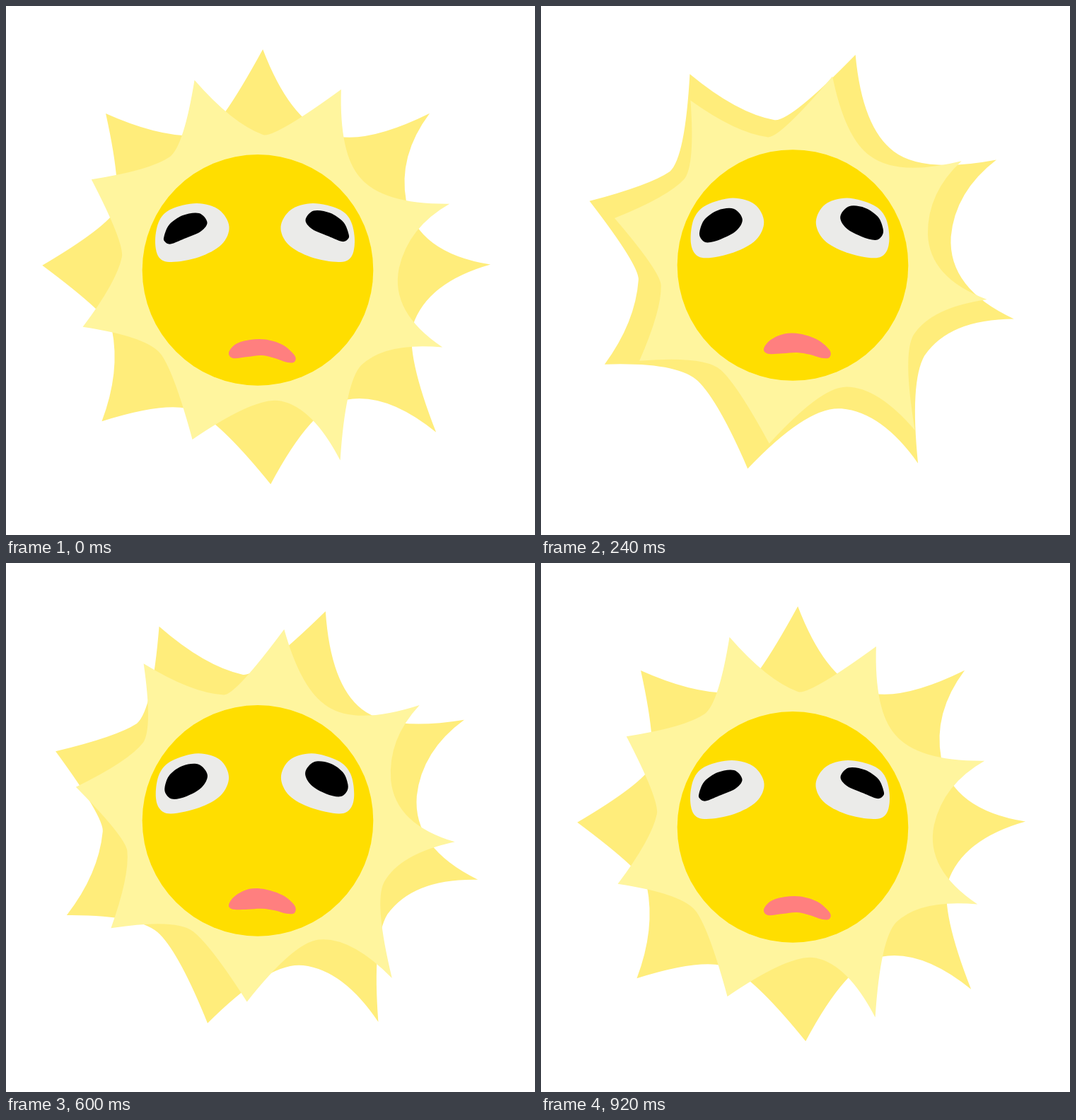
Write an HTML page with a canvas that moves like this. It is 748 px wide and 748 px high and loops after 960 ms.

```html
<!DOCTYPE html>
<html lang="en">
<head>
<meta charset="utf-8">
<title>Sun</title>
<style>
html, body { margin: 0; height: 100%; overflow: hidden; background: #fff; }
canvas { display: block; }
</style>
</head>
<body>
<canvas id="stage" width="748" height="748"></canvas>
<script>
const ctx = document.getElementById('stage').getContext('2d');
const STEP = 40, FRAMES = 24, PEAK = 11, END = 23, LIFT = 6.1;

// Ray outlines, drawn halfway through their twist.
const outerRays = {
  color: '#ffed7b', cx: 369, cy: 361.6, twist: 0.2025,
  path: new Path2D(`M192,110 Q262,160 316,166 Q338,167 423,66
    Q440,168 487,198 Q530,226 632,199 Q577,248 576,312 Q577,385 673,421
    Q582,428 551,482 Q533,520 553,634 Q497,566 440,565 Q392,564 314,659
    Q266,567 235,541 Q205,516 102,527 Q141,465 141,405 Q141,385 64,299
    Q148,270 174,249 Q194,228 192,110Z`)
};
const innerRays = {
  color: '#fff59e', cx: 370, cy: 365.4, twist: -0.2062,
  path: new Path2D(`M218,130 Q281,178 326,185 Q342,187 419.5,101.7
    Q435,190 470,216 Q508,246 598.5,226.5 Q549,270 548,328 Q548,390 629,423
    Q550,432 524,470 Q507,497 522,605 Q470,541 425,541 Q390,541 315.6,618
    Q273,534 250,512 Q228,491 135.5,496 Q169,425 169,390 Q168,370 106,293.5
    Q183,265 206,241 Q222,222 218,130Z`)
};

// Face parts: outline points at rest and at the top of the bounce.
const eye = {
  color: '#ebebe9',
  rest: [211,325, 217,297, 234,281, 270,273, 301,282, 315.5,306, 305,331, 273,349, 234,356, 216,349],
  peak: [212,331, 217,302, 235,283, 272,272, 303,281, 315,306, 303,332, 273,349, 233,358, 217,350]
};
const pupil = {
  color: '#000',
  rest: [223.5,320, 231,303, 250,290, 273,287, 284.5,300, 275,313, 252,323, 233,330.5, 224.5,327],
  peak: [225,319, 232,302, 250,289.5, 272,288, 285,304, 277,323, 257,336, 237,339, 227,331]
};
const mouth = {
  color: '#ff7f7f',
  rest: [315,484, 325,472, 345,466, 367,465.5, 391,473, 408,488, 408,497, 398,498, 380,492, 362,488, 342,490, 321,492],
  peak: [315,487, 324,474, 344,463, 367,464, 392,473, 408,487, 408,498, 396,499, 380,495, 362,493, 342,493.5, 321,493]
};

const easeInOut = x => x * x * (3 - 2 * x);
const easeOut = x => x + x * x - x * x * x;

function progress(frame, easeUp) {
  return frame < PEAK
    ? easeUp(frame / PEAK)
    : 1 - easeInOut((frame - PEAK) / (END - PEAK));
}

// The points move in straight lines, so the star shrinks a little midway.
function drawRays({ color, cx, cy, twist, path }, p) {
  const k = twist * (2 * p - 1);
  ctx.save();
  ctx.translate(cx, cy);
  ctx.transform(1, k, -k, 1, 0, 0);
  ctx.translate(-cx, -cy);
  ctx.fillStyle = color;
  ctx.fill(path);
  ctx.restore();
}

function drawBlob({ color, rest, peak }, p) {
  const at = rest.map((v, i) => v + (peak[i] - v) * p);
  const n = at.length / 2;
  const point = i => [at[(i + n) % n * 2], at[(i + n) % n * 2 + 1]];
  ctx.beginPath();
  ctx.moveTo(...point(0));
  for (let i = 0; i < n; i++) {
    const [a, b, c, d] = [i - 1, i, i + 1, i + 2].map(point);
    ctx.bezierCurveTo(
      b[0] + (c[0] - a[0]) / 6, b[1] + (c[1] - a[1]) / 6,
      c[0] - (d[0] - b[0]) / 6, c[1] - (d[1] - b[1]) / 6, ...c);
  }
  ctx.fillStyle = color;
  ctx.fill();
}

function drawMirrored(blob, p, dx, dy) {
  ctx.save();
  ctx.transform(-1, 0, 0, 1, dx, dy);
  drawBlob(blob, p);
  ctx.restore();
}

function draw(frame) {
  const p = progress(frame, easeInOut);
  ctx.setTransform(1, 0, 0, 1, 0, 0);
  ctx.fillStyle = '#fff';
  ctx.fillRect(0, 0, 748, 748);
  ctx.translate(0, LIFT * (1 - 2 * p));

  drawRays(outerRays, progress(frame, easeOut));
  drawRays(innerRays, p);

  ctx.beginPath();
  ctx.arc(356, 367.3, 163.3, 0, 2 * Math.PI);
  ctx.fillStyle = '#ffde00';
  ctx.fill();

  drawBlob(eye, p);
  drawMirrored(eye, p, 704, 0);
  drawBlob(pupil, p);
  drawMirrored(pupil, p, 708, -3.5);
  drawBlob(mouth, p);
}

function tick() {
  draw(Math.floor(performance.now() / STEP) % FRAMES);
  requestAnimationFrame(tick);
}
tick();
</script>
</body>
</html>
```
